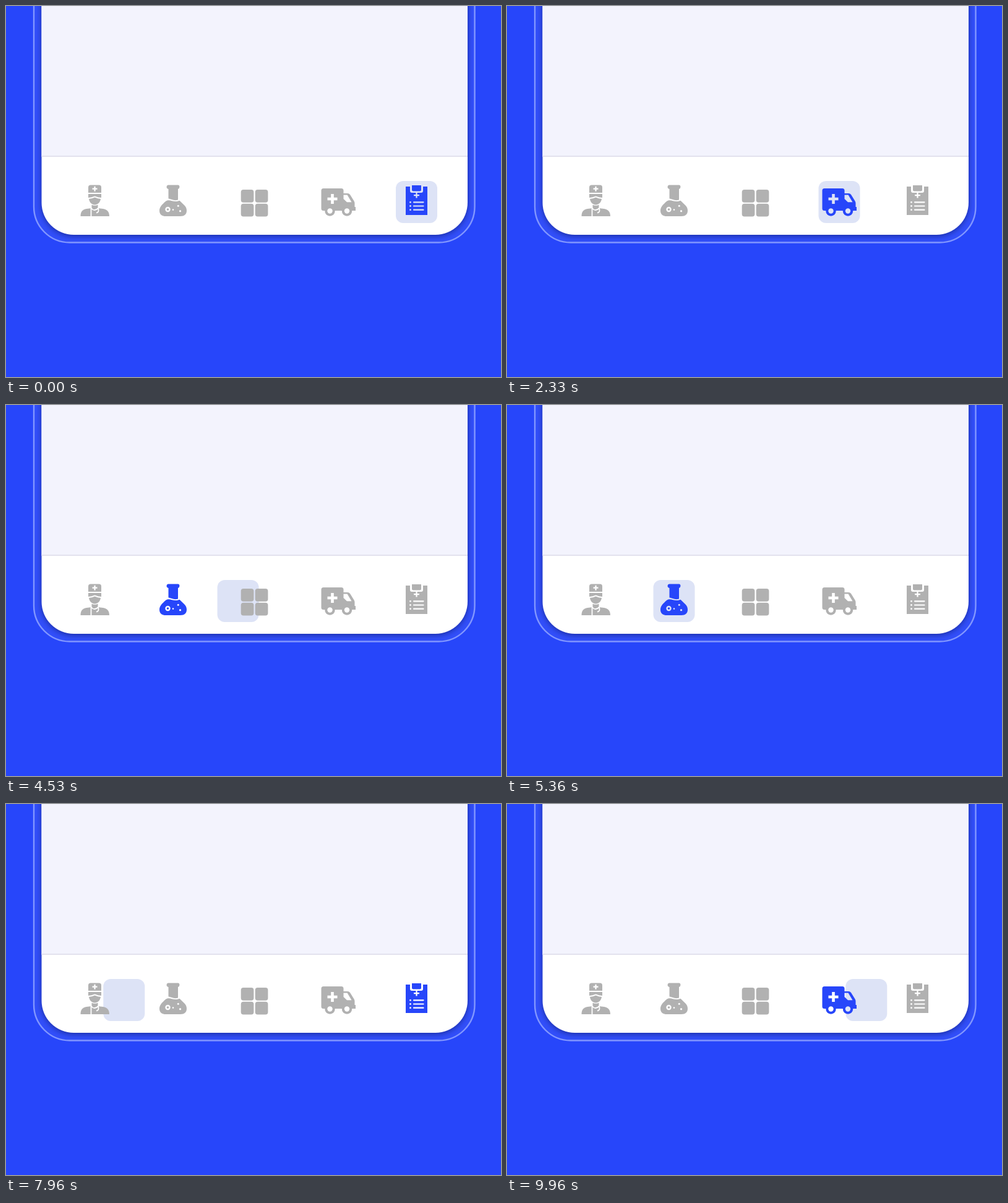
Recreate the animation shown at these times as an HTML page. Size 800x600 px, loop 10000 ms.

```html
<!DOCTYPE html>
<html lang="en">
<head>
<meta charset="utf-8">
<title>Tab bar</title>
<style>
  html, body { margin: 0; width: 100%; height: 100%; overflow: hidden; background: #2746fa; }
  svg { display: block; width: 100%; height: 100%; }
  .phone { filter: drop-shadow(0 2px 5px rgba(0, 10, 70, .5)); }
  .icon { fill: #b1b1b1; }
  .icon.active { fill: #2746fa; }
</style>
</head>
<body>
<svg viewBox="0 0 800 600">
  <rect x="45" y="-100" width="712.5" height="482.5" rx="58" fill="#fff" fill-opacity=".05" stroke="#8297ff" stroke-width="2.4"/>
  <rect class="phone" x="57.5" y="-100" width="688.5" height="470" rx="52" fill="#fff"/>
  <path d="M57.5 0H746V243H57.5Z" fill="#f3f3fd"/>
  <path d="M57.5 243H746" stroke="#e2e1ee" stroke-width="2"/>
  <rect id="highlight" y="283" width="67" height="68" rx="12" fill="#dde3f6"/>
  <g id="icons"></g>
  <path id="cursor" d="M697.3 205.8V221.6L700.9 218.2L703.4 223.6L706 222.4L703.6 217.2H708.4Z" fill="#fff" stroke="#333" stroke-width="1"/>
</svg>
<script>
const plus = (x, y, r, w) => `<path d="M${x - r} ${y}H${x + r}M${x} ${y - r}V${y + r}" stroke-width="${w}"/>`;
const dot = (x, y, r) => `<circle cx="${x}" cy="${y}" r="${r}" fill="#000" stroke="none"/>`;
const tile = (x, y) => `<rect x="${x}" y="${y}" width="20.7" height="20.7" rx="4"/>`;
const path = d => `<path d="${d}"/>`;

// Each tab: left edge of its highlight, solid shapes, and the parts cut out of them.
const tabs = [
  {
    x: 110,
    solid: path("M133 302V293Q133 289.5 137 289.5H150Q154 289.5 154 293V302Z") +
      path("M133 304H154V310Q149 309.5 143.5 307.5Q138 309.5 133 310Z") +
      path("M134 312Q139 311.5 143.5 309.5Q148 311.5 153 312C152 318 148 321.5 143.5 321.5S135 318 134 312Z") +
      path("M138.5 321.5Q143.5 324 148.5 321.5V327L157 328C163 329 167 332 167 340H120.5C120.5 332 124 329 130 328L138.5 327Z"),
    cut: plus(143.5, 295.7, 4, 2.2) +
      `<path d="M137.5 341V326M137.5 327Q143 333 149 327Q151 334 146 334.5" stroke-width="1.8"/>`
  },
  {
    x: 236.5,
    solid: path("M262 289.5H278.5Q280.5 290 280.5 292.5T278 296V313.5Q273 315 268 313T262.5 311.5V296Q259.5 295 259.5 292.5T262 289.5Z") +
      path("M258.5 315.5C265 311.5 271 319 280.5 314.8L288.5 322.5C291 325 292 328 292 331C292 337 288 340 282 340H258C252 340 248 337 248 331C248 325 252 321 258.5 315.5Z"),
    cut: `<circle cx="261.5" cy="329" r="3" stroke-width="2.4"/>` +
      dot(270, 329.5, 1.3) + dot(278.3, 323.3, 1.5) + dot(281.5, 331.7, 1.6)
  },
  {
    x: 368,
    solid: tile(379.7, 297) + tile(402.7, 297) + tile(379.7, 319.8) + tile(402.7, 319.8),
    cut: ""
  },
  {
    x: 503.5,
    solid: path("M513 295H542Q545.5 295 545.5 298.5V303H552Q554.5 303 556 305L562.5 315.5Q563.5 317 563.5 319V325H565V331H513Q509.5 331 509.5 327.5V298.5Q509.5 295 513 295Z") +
      `<circle cx="523.5" cy="331.5" r="8.2"/><circle cx="551" cy="331.5" r="8.2"/>`,
    cut: plus(527.5, 312, 8, 4.6) + dot(523.5, 331.5, 4.2) + dot(551, 331.5, 4.2) +
      `<path d="M545.5 305.5H551.5L558.5 317.3H551L545.5 312Z" fill="#000" stroke="none"/>`
  },
  {
    x: 630,
    solid: path("M646 292H653V299Q653 302 656 302H671Q674 302 674 299V292H681V338H646Z") +
      path("M656 290H671V297.5Q671 299.5 669 299.5H658Q656 299.5 656 297.5Z"),
    cut: plus(663.5, 306.2, 4.4, 2.2) +
      [317.3, 323.5, 329.7].map(y => dot(653.5, y, 1.4) + `<path d="M659 ${y}H674.5" stroke-width="2.2" stroke-linecap="round"/>`).join("")
  }
];

const icons = document.getElementById("icons");
const highlight = document.getElementById("highlight");
const cursor = document.getElementById("cursor");

icons.innerHTML = tabs.map(({ solid, cut }, i) => `
  <mask id="cut${i}" maskUnits="userSpaceOnUse" x="0" y="0" width="800" height="600">
    <rect width="800" height="600" fill="#fff"/><g fill="none" stroke="#000">${cut}</g>
  </mask>
  <g class="icon" mask="url(#cut${i})">${solid}</g>`).join("");
const shapes = [...icons.querySelectorAll(".icon")];

const LOOP = 10000, SLIDE = 500;
const taps = [[863, 3], [2615, 2], [4387, 1], [6191, 0], [7868, 4], [9659, 3]];
const ease = p => p * p * (3 - 2 * p);

function draw(now) {
  const t = now % LOOP;
  let from = 4, to = 4, start = -SLIDE;
  for (const [time, tab] of taps) {
    if (t >= time) { from = to; to = tab; start = time; }
  }
  const p = ease(Math.min(1, (t - start) / SLIDE));
  highlight.setAttribute("x", tabs[from].x + (tabs[to].x - tabs[from].x) * p);
  shapes.forEach((shape, i) => shape.classList.toggle("active", i === to));
  cursor.style.display = t >= 5700 && t < 6750 ? "" : "none";
}

const begin = performance.now();
function tick() {
  draw(performance.now() - begin);
  requestAnimationFrame(tick);
}
tick();
</script>
</body>
</html>
```
